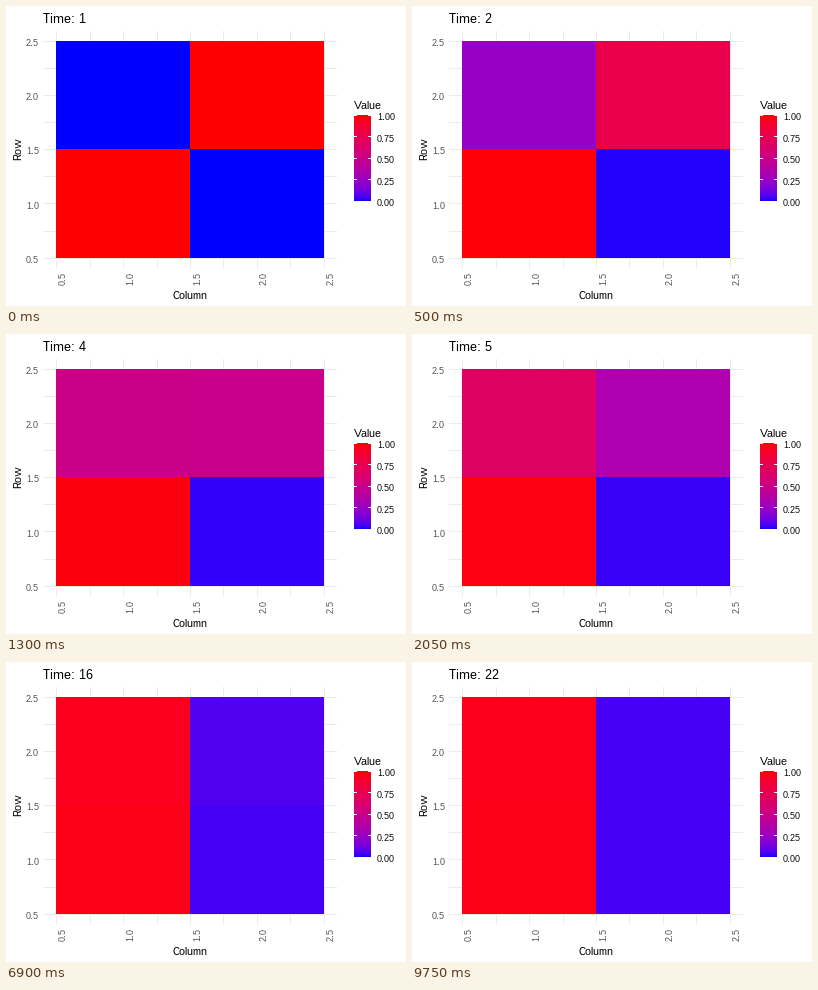
Animation, 400 px wide and 300 px high, one loop 10000 ms. Source, as a matplotlib script:

```python
import numpy as np
import matplotlib.pyplot as plt
from matplotlib.animation import FuncAnimation
from matplotlib.patches import Rectangle

WIDTH, HEIGHT, DPI = 400, 300, 100
FRAMES, INTERVAL = 200, 50
LAST_STEP = 21
GRID, TICK_TEXT = "#ebebeb", "#4d4d4d"
BLUE_LAB = np.array([32.30, 79.19, -107.86])
RED_LAB = np.array([53.24, 80.09, 67.20])
TRANSITION = np.array([[0.99, 0.01], [0.23, 0.77]])

plt.rcParams.update({
    "font.family": "Liberation Sans",
    "text.hinting": "native",
    "text.hinting_factor": 1,
    "text.kerning_factor": 6,
    "toolbar": "None",
})


def ramp(value):
    """Blue-to-red colour for a value in 0..1, blended in CIE Lab."""
    L, a, b = BLUE_LAB + (RED_LAB - BLUE_LAB) * value
    fy = (L + 16) / 116
    f = np.array([fy + a / 500, fy, fy - b / 200])
    xyz = np.where(f > 6 / 29, f**3, (f - 4 / 29) * 3 * (6 / 29) ** 2)
    xyz = xyz * [0.95047, 1, 1.08883]
    rgb = np.array([[3.2406, -1.5372, -0.4986],
                    [-0.9689, 1.8758, 0.0415],
                    [0.0557, -0.2040, 1.0570]]) @ xyz
    rgb = np.clip(rgb, 0, 1)
    return np.where(rgb > 0.0031308,
                    1.055 * rgb ** (1 / 2.4) - 0.055, 12.92 * rgb)


def matrix_at(step):
    """Power of the transition matrix, linear between whole steps."""
    low = min(int(step), LAST_STEP - 1)
    before = np.linalg.matrix_power(TRANSITION, low)
    return before + (before @ TRANSITION - before) * (step - low)


fig = plt.figure(figsize=(WIDTH / DPI, HEIGHT / DPI), dpi=DPI, facecolor="white")
ax = fig.add_axes([0, 0, 1, 1])


def box(x0, y0, x1, y1, color, z=1):
    return ax.add_patch(Rectangle((x0, y0), x1 - x0, y1 - y0, facecolor=color,
                                  linewidth=0, antialiased=False, zorder=z))


def label(x, y, text, px, color="black", **options):
    options = {"va": "baseline", **options}
    return ax.text(x, y, text, fontsize=px * 72 / DPI, color=color, zorder=5,
                   **options)


def vertical_label(x, y, text, px, color="black", **options):
    return label(x, y, text, px, color, rotation=90, rotation_mode="anchor",
                 **options)


# Panel grid: major and minor lines alternate
for i in range(9):
    x = round(50.2 + 33.45 * i)
    y = round(251.72 - 27.14 * i)
    box(x, 25, x + 1, 263, GRID)
    box(37, y, 331, y + 1, GRID)

for i in range(5):
    text = f"{0.5 + i / 2:.1f}"
    label(33, round(257 - 54.25 * i), text, 9, TICK_TEXT, ha="right")
    vertical_label(60 + 67 * i, 266, text, 9, TICK_TEXT, ha="right")

label(184, 293, "Column", 11, ha="center")
vertical_label(15, 142, "Row", 11, ha="center")
title = label(37, 17, "", 13)

# Tiles as (row, column); row 0 is at the bottom
tiles = {(r, c): box((50, 184)[c], (143, 35)[r], (184, 318)[c], (252, 143)[r],
                     "white", 3)
         for r in range(2) for c in range(2)}

# Colour bar
label(348, 103, "Value", 11)
bar = np.array([[ramp(1 - (row + 0.5) / 86)] for row in range(86)])
ax.imshow(bar, extent=(348, 365, 195, 109), aspect="auto",
          interpolation="nearest", zorder=2)
for i in range(5):
    y = int(195 - 21.5 * i)
    box(348, y, 351, y + 1, "white", 4)
    box(362, y, 365, y + 1, "white", 4)
    label(371, round(200 - 21.4 * i), f"{i / 4:.2f}", 9)

ax.set(xlim=(0, WIDTH), ylim=(HEIGHT, 0))
ax.axis("off")


def draw(frame):
    step = LAST_STEP * frame / (FRAMES - 1)
    values = matrix_at(step)
    for cell, tile in tiles.items():
        tile.set_facecolor(ramp(values[cell]))
    title.set_text(f"Time: {round(1 + step)}")
    return [title, *tiles.values()]


animation = FuncAnimation(fig, draw, frames=FRAMES, interval=INTERVAL,
                          repeat=True, repeat_delay=0)
plt.show()
```
